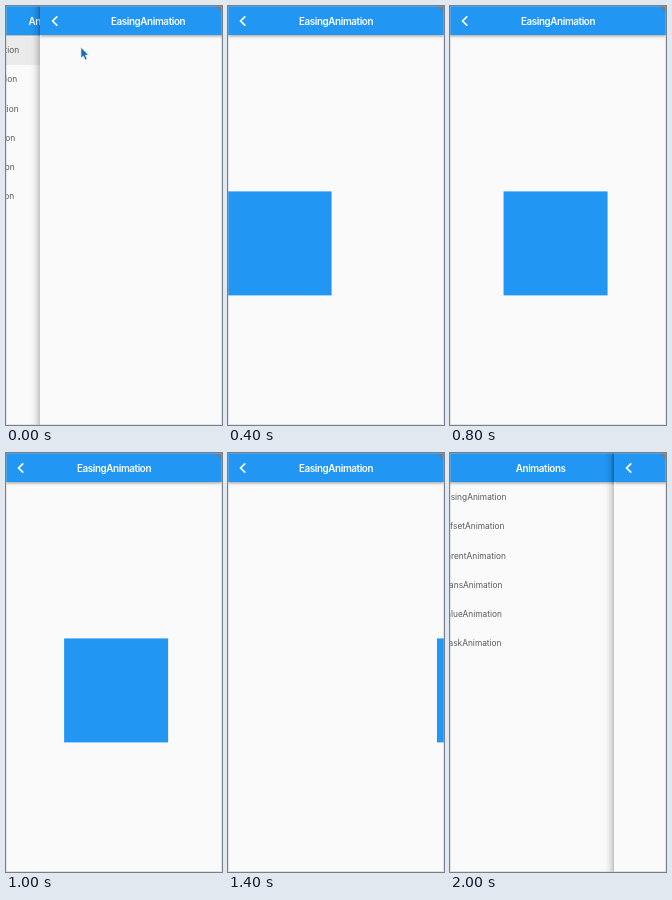
An HTML page for the animation above (2100 ms loop, 216 by 419 pixels).

```html
<!DOCTYPE html>
<html lang="en">
<head>
<meta charset="utf-8">
<title>Easing animation</title>
<style>
  html, body { margin: 0; width: 100%; height: 100%; overflow: hidden; background: #fafafa; }
  #stage { position: relative; width: 216px; height: 419px; overflow: hidden; font-family: Inter, Roboto, sans-serif; }
  .screen { position: absolute; inset: 0; background: #fafafa; }
  .bar {
    position: absolute; top: 0; left: 0; width: 216px; height: 29px;
    background: #2196f3; box-shadow: 0 1px 3px rgba(0, 0, 0, .4);
    color: #fff; font-size: 9.8px; font-weight: 600; letter-spacing: -.038em;
    line-height: 31px; text-align: center;
  }
  .row {
    position: relative; top: 30px; height: 29.25px; padding-left: 8.3px;
    font-size: 8.35px; line-height: 29.25px; color: #5a5a5a;
  }
  .row.pressed { background: #ebebeb; }
  #page::before {
    content: ""; position: absolute; top: 0; bottom: 0; left: -10.8px; width: 10.8px;
    background: linear-gradient(to right, #0000, #00000004 30%, #00000012 60%, #00000038);
  }
  #square { position: absolute; left: 56px; top: 185px; width: 104px; height: 104px; background: #2196f3; }
  svg { position: absolute; left: 0; top: 0; }
</style>
</head>
<body>
<div id="stage">
  <div id="list" class="screen"><div class="bar">Animations</div></div>
  <div id="page" class="screen">
    <div id="square"></div>
    <div class="bar">EasingAnimation
      <svg width="30" height="30"><path d="M17.3 10.3 12.6 15 17.3 19.7" fill="none" stroke="#fff" stroke-width="1.7"/></svg>
    </div>
  </div>
  <svg width="216" height="419">
    <path d="M209 0H216V7Z" fill="#6b7f90"/>
    <rect x=".5" y=".5" width="215" height="418" fill="none" stroke="#b8b8b8" stroke-opacity=".35"/>
    <path id="cursor" d="M75 41.5V52L77.4 49.9 79.2 53.8 81 52.9 79.3 49.2 82.3 48.8Z"
          fill="#1b6cae" stroke="#d5e6f3" stroke-width=".6"/>
  </svg>
</div>
<script>
const WIDTH = 216, LOOP = 2100, STEP = 100;
const ENTER = -87, SECOND = 934, TRAVEL = 1030, PUSH = 222, BACK = 2000;
const $ = id => document.getElementById(id);
const list = $('list'), page = $('page'), square = $('square'), cursor = $('cursor');

const rows = ['Easing', 'Offset', 'Parent', 'Trans', 'Value', 'Mask'].map(name => {
  const row = document.createElement('div');
  row.className = 'row';
  row.textContent = name + 'Animation';
  list.append(row);
  return row;
});

function bezier(x1, y1, x2, y2) {
  const at = (a, b, s) => 3 * a * s * (1 - s) ** 2 + 3 * b * s * s * (1 - s) + s ** 3;
  return x => {
    if (x <= 0) return 0;
    if (x >= 1) return 1;
    let low = 0, high = 1;
    for (let i = 0; i < 24; i++) {
      const mid = (low + high) / 2;
      if (at(x1, x2, mid) < x) low = mid; else high = mid;
    }
    return at(y1, y2, low);
  };
}
const fastOutSlowIn = bezier(.4, 0, .2, 1);
const linearToEaseOut = bezier(.35, .91, .33, .97);

const move = (el, x, y = 0) => { el.style.transform = `translate(${x}px, ${y}px)`; };

function draw(t) {
  const pageX = t >= BACK ? 164 : WIDTH * (1 - linearToEaseOut((t - ENTER) / PUSH));
  const slide = fastOutSlowIn((t - ENTER) / TRAVEL) - 1 + fastOutSlowIn((t - SECOND) / TRAVEL);
  move(page, pageX);
  move(list, (pageX - WIDTH) / 3);
  move(square, slide * WIDTH, .4);
  rows[0].classList.toggle('pressed', t < BACK);
  cursor.style.display = t < STEP ? '' : 'none';
}

const start = performance.now();
function tick() {
  const t = (performance.now() - start) % LOOP;
  draw(Math.floor(t / STEP) * STEP);
  requestAnimationFrame(tick);
}
tick();
</script>
</body>
</html>
```
